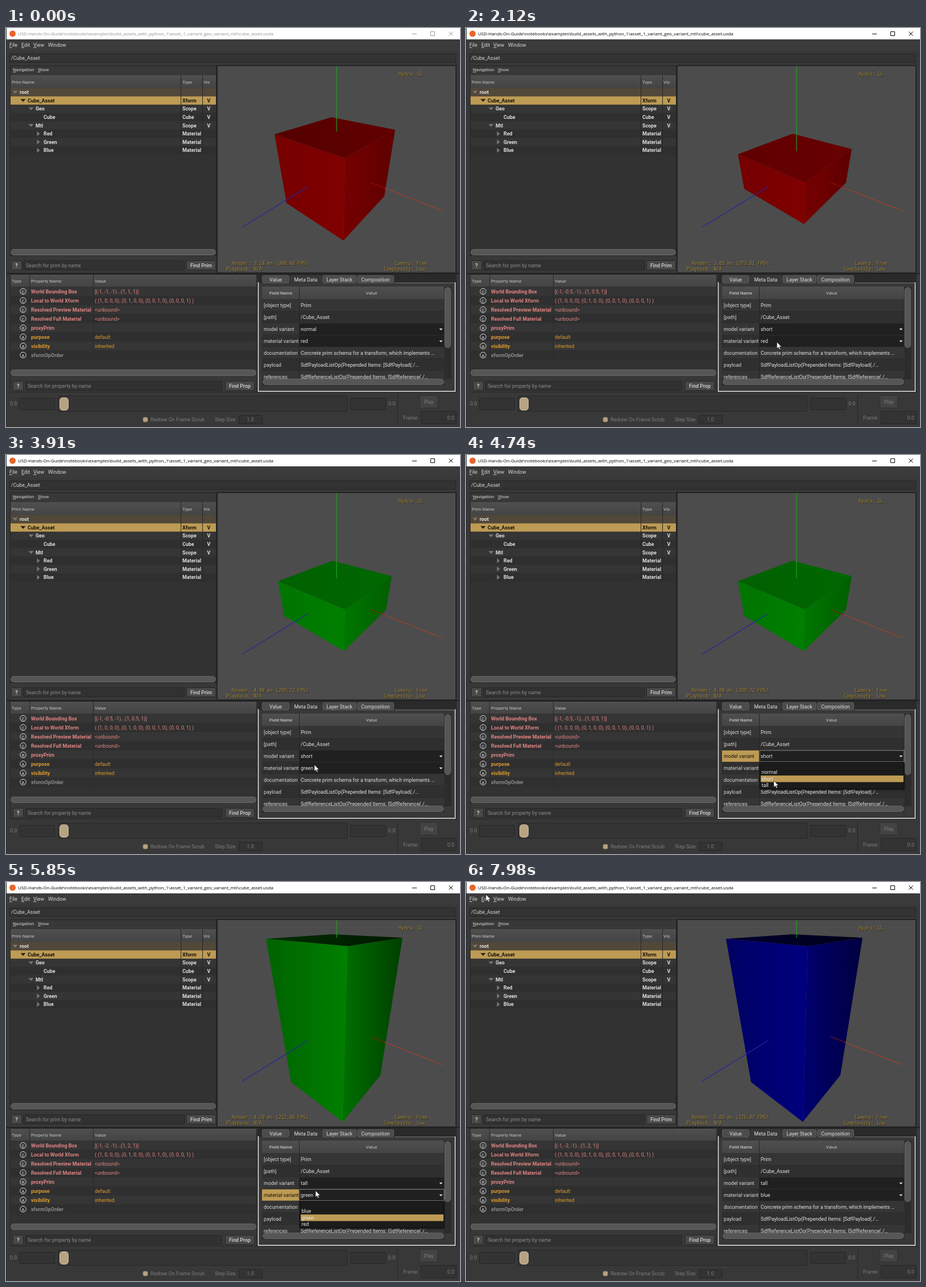
An HTML page that plays this animation: 798 px wide and 702 px high, repeating every 8 s.

```html
<!DOCTYPE html>
<html lang="en">
<head>
<meta charset="utf-8">
<title>Variant switching</title>
<style>
html, body { margin: 0; width: 100%; height: 100%; overflow: hidden; background: #383838; }
svg { display: block; width: 798px; height: 702px; font: 8.9px Roboto, sans-serif; }
.b { font-weight: 700; }
.m { font-weight: 500; }
.s { font-size: 8px; }
.title { font: 7.9px "Open Sans", sans-serif; }
.hud { font: 8px "DejaVu Sans Mono", monospace; }
</style>
</head>
<body>
<svg id="stage" viewBox="0 0 798 702"></svg>
<script>
const LIGHT = '#d6d6d6', GOLD = '#bd9b54', PINK = '#e08482', AMBER = '#dc9a2c', DIM = '#7d7d7d';

const rect = (x, y, w, h, fill, extra = '') =>
  `<rect x="${x}" y="${y}" width="${w}" height="${h}" fill="${fill}" ${extra}/>`;
const box = (x, y, w, h, fill, line = '#262626', r = 1) =>
  rect(x + .5, y + .5, w - 1, h - 1, fill, `stroke="${line}" rx="${r}"`);
// y is the vertical middle of the text line
const text = (x, y, s, fill = LIGHT, cls = '', extra = '') =>
  `<text x="${x}" y="${y + 3.2}" fill="${fill}" class="${cls}" ${extra}>${s}</text>`;
const mid = 'text-anchor="middle"';
const path = (d, fill, extra = '') => `<path d="${d}" fill="${fill}" ${extra}/>`;
const line = (d, color, w = 1) => path(d, 'none', `stroke="${color}" stroke-width="${w}"`);
const down = (x, y, c) => path(`M${x - 4.5} ${y - 2.5}h9l-4.5 5z`, c);
const right = (x, y, c) => path(`M${x - 2.5} ${y - 4.5}v9l5-4.5z`, c);
const mnemonic = s => `<tspan text-decoration="underline">${s[0]}</tspan>${s.slice(1)}`;
const hud = (x, y, s, id = '') =>
  `<text class="hud" x="${x + .7}" y="${y + 3.7}" fill="#1c1a14" data-hud="${id}">${s}</text>` +
  `<text class="hud" x="${x}" y="${y + 3}" fill="#a98a3a" data-hud="${id}">${s}</text>`;

function titleBar() {
  return rect(0, 0, 798, 20, '#fff') + '<circle cx="11.5" cy="10" r="5.5" fill="#e8662a"/>' +
    text(21, 10, 'USD-Hands-On-Guide\\notebooks\\examples\\build_assets_with_python_1' +
      '\\asset_1_variant_geo_variant_mtl\\cube_asset.usda', '#000', 'title', 'id="title"') +
    '<g id="buttons" fill="none" stroke="#000">' +
    '<path d="M714 10.5h8M746.5 6.5h7v7h-7zM778.500 6.500l7 7M785.500 6.500l-7 7"/></g>';
}

function menu() {
  return rect(0, 20, 798, 20, '#3b3b3b') +
    text(6, 30, mnemonic('File')) + text(27, 30, mnemonic('Edit')) +
    text(48, 30, mnemonic('View')) + text(74, 30, 'Window') +
    box(6, 45, 785, 16, '#333') + text(9, 53, '/Cube_Asset');
}

function tree() {
  const rows = [
    ['root', 24, '', ''], ['Cube_Asset', 38, 'Xform', 'V'], ['Geo', 52, 'Scope', 'V'],
    ['Cube', 66, 'Cube', 'V'], ['Mtl', 52, 'Scope', 'V'], ['Red', 66, 'Material', ''],
    ['Green', 66, 'Material', ''], ['Blue', 66, 'Material', '']
  ];
  let out = rect(7, 66, 363, 335, '#242424') + rect(8, 67, 361, 16, '#383838') +
    text(12, 73, mnemonic('Navigation'), LIGHT, '', 'style="font-size:7.8px"') +
    text(56, 73, mnemonic('Show'), LIGHT, '', 'style="font-size:7.8px"') +
    rect(8, 83, 361, 23, 'url(#head)') +
    text(10, 95, 'Prim Name', '#c4c4c4', 's') + text(310, 95, 'Type', '#c4c4c4', 's') +
    text(347, 95, 'Vis', '#c4c4c4', 's') + rect(8, 106, 361, 283, '#323232');
  rows.forEach(([name, x, type, vis], i) => {
    const y = 113 + i * 14.6, sel = i === 1, c = sel ? '#17130a' : '#dedede';
    const fill = i === 0 ? '#52483a' : sel ? GOLD : i % 2 ? '#2f2f2f' : '#353535';
    out += rect(8, y - 7.3, 361, 14.6, fill);
    if (i === 4) out += rect(36, y - 7.3, 333, 14.6, '#52483a', 'id="hover"');
    if (i > 4) out += right(57, y, '#777');
    else if (i !== 3) out += down(x - 8, y, sel ? '#2a2110' : '#777');
    out += text(x, y, name, c, 'b') + text(310, y, type, c, 'b') + text(356.5, y, vis, c, 'b', mid);
  });
  return out + rect(307, 83, 1, 140, '#262626') + rect(345, 83, 1, 140, '#262626') +
    rect(8, 389, 361, 11.5, '#2c2c2c') + box(8, 389, 361, 11, '#565656', '#686868', 5) +
    box(9, 409, 19, 17, '#494949') + text(18.5, 417.5, '?', LIGHT, 'b', mid) +
    box(30, 409, 284, 17, '#313131') + text(35, 417.5, 'Search for prim by name', '#8c8c8c') +
    box(317, 409, 52, 17, '#494949') + text(343, 417.5, 'Find Prim', LIGHT, 'm', mid);
}

function viewport() {
  return rect(370, 65, 422, 367, '#242424') + rect(372, 67, 418, 363, '#4c4c4c') +
    '<path id="faceTop" fill="url(#gTop)"/><path id="faceLeft" fill="url(#gLeft)"/>' +
    '<path id="faceRight" fill="url(#gRight)"/>' +
    '<path id="axisY" stroke="#1fa01f" stroke-width="1.2"/>' +
    line('M531 279L415 350.500', '#25259a', 1.2) +
    line('M641 272L665 281.500', '#a01408') +
    path('M665 281.500L768 322', 'none', 'stroke="#c23a22" stroke-width="1.2" stroke-dasharray="2 .7"') +
    hud(690, 81, 'Hydra: GL') + hud(397, 414, '', 'render') + hud(387, 424, 'Playback: N/A') +
    hud(683, 414, 'Camera: Free') + hud(664, 424, 'Complexity: Low');
}

function properties() {
  const rows = [
    ['C', 'World Bounding Box', ' ', PINK],
    ['C', 'Local to World Xform', '( (1, 0, 0, 0), (0, 1, 0, 0), (0, 0, 1, 0), (0, 0, 0, 1) )', PINK],
    ['C', 'Resolved Preview Material', '&lt;unbound&gt;', PINK],
    ['C', 'Resolved Full Material', '&lt;unbound&gt;', PINK],
    ['R', 'proxyPrim', '', PINK], ['A', 'purpose', 'default', AMBER],
    ['A', 'visibility', 'inherited', AMBER], ['A', 'xformOpOrder', '', '#8c8c8c']
  ];
  let out = rect(0, 431, 798, 2, '#222') + rect(7, 433, 434, 208, '#262626') +
    rect(8, 434, 432, 206, '#383838') + rect(8, 434, 432, 21, 'url(#head)') +
    text(10, 444.5, 'Type', '#c4c4c4', 's') + text(44, 444.5, 'Property Name', '#c4c4c4', 's') +
    text(156, 444.5, 'Value', '#c4c4c4', 's') + rect(8, 455, 432, 146, '#323232');
  rows.forEach(([kind, name, value, c], i) => {
    const y = 463.5 + i * 16;
    out += rect(8, y - 8, 432, 16, i % 2 ? '#2f2f2f' : '#353535') +
      `<circle cx="30" cy="${y}" r="5.2" fill="none" stroke="#dcdcdc"/>` +
      text(30, y - .2, kind, '#e8e8e8', '', `${mid} style="font-size:7.5px"`) +
      text(44, y, name, c, 'b') + text(156, y, value, c, '', i ? '' : 'id="bounds"');
  });
  return out + rect(41, 434, 1, 150, '#2a2a2a') + rect(153, 434, 1, 150, '#2a2a2a') +
    box(8, 601, 432, 11, '#565656', '#686868', 5) +
    box(12, 621, 19, 17, '#494949') + text(21.5, 629.5, '?', LIGHT, 'b', mid) +
    box(34, 621, 346, 17, '#313131') + text(38, 629.5, 'Search for property by name', '#8c8c8c') +
    box(385, 621, 52, 17, '#494949') + text(411, 629.5, 'Find Prop', LIGHT, 'm', mid);
}

function metadata() {
  const rows = [
    ['[object type]', 'Prim'], ['[path]', '/Cube_Asset'], ['model variant', ''],
    ['material variant', ''], ['documentation', 'Concrete prim schema for a transform, which implements …'],
    ['payload', 'SdfPayloadListOp(Prepended Items: [SdfPayload(./…'],
    ['references', 'SdfReferenceListOp(Prepended Items: [SdfReference(./…']
  ];
  const tabs = [['Value', 450, 48], ['Meta Data', 499, 56], ['Layer Stack', 556, 60], ['Composition', 617, 65]];
  let out = rect(442, 433, 350, 208, '#2a2a2a') + rect(444, 449, 345, 189, '#383838') +
    line('M683 448.500H790', '#777') + line('M443.500 447V639.300H789.500V447.500', '#ececec', 1.4);
  tabs.forEach(([s, x, w], i) => {
    out += box(x, 435, w, 14, i === 1 ? '#383838' : '#4c4c4c', i === 1 ? '#383838' : '#5c5c5c', 2) +
      text(x + w / 2, 442.5, s, '#e2e2e2', '', mid);
  });
  out += rect(450, 455, 321, 162, '#303030') + rect(450, 455, 320, 22, 'url(#head)') +
    text(483, 466, 'Field Name', '#c4c4c4', 's m', mid) + text(642.5, 466, 'Value', '#c4c4c4', 's', mid) +
    '<svg x="450" y="477" width="321" height="140" viewBox="450 477 321 140">';
  rows.forEach(([name, value], i) => {
    const y = 488 + i * 20.9, combo = i === 2 || i === 3;
    out += rect(450, y - 10.4, 320, 20.9, i % 2 ? '#2f2f2f' : '#353535') +
      rect(450, y + 10, 320, .7, '#262626');
    if (combo) out += rect(516, y - 10, 254, 20, '#202020', `id="combo${i - 2}"`) +
      rect(450, y - 10, 65, 20, GOLD, `id="cell${i - 2}"`) +
      path(`M761.500 ${y - 1}h6l-3 3z`, '#eee');
    out += text(453, y, name, LIGHT, '', combo ? `id="name${i - 2}"` : '') +
      text(518, y, value, '#e2e2e2', '', combo ? `id="value${i - 2}"` : '');
  });
  return out + '</svg>' + rect(515, 455, 1, 162, '#262626') +
    rect(771, 455, 12, 163, '#2c2c2c') + box(771, 456, 11, 107, '#565656', '#686868', 5) +
    rect(450, 617, 321, 12, '#2c2c2c') + box(451, 617, 319, 11, '#565656', '#686868', 5);
}

function timeline() {
  return text(7, 661, '0.0', DIM) + box(23, 651, 63, 21, '#333') +
    box(91, 647, 509, 28, '#343434') + box(94, 650, 16, 23, '#b7a282', '#d2c3aa', 5) +
    box(605, 651, 63, 21, '#333') + text(672, 661, '0.0', DIM) +
    rect(688, 645, 1, 53, '#272727') + box(727, 646, 32, 23, '#434343', '#303030', 2) +
    text(743, 658, 'Play', DIM, '', mid) + text(698, 686, 'Frame:', DIM) +
    box(729, 674, 63, 23, '#333') + text(788, 686, '0.0', DIM, '', 'text-anchor="end"') +
    box(240.500, 684.500, 9, 9, '#b7a282', '#8c7c64', 2) + text(254, 689, 'Redraw On Frame Scrub', DIM) +
    text(367, 689, 'Step Size', DIM) + box(409, 681, 42, 16, '#333') + text(429.5, 689, '1.0', DIM, '', mid);
}

const gradient = id => `<linearGradient id="${id}"><stop/><stop offset="1"/></linearGradient>`;
const stage = document.getElementById('stage');
stage.innerHTML =
  '<defs><linearGradient id="head" x2="0" y2="1"><stop stop-color="#4f4f4f"/>' +
  '<stop offset="1" stop-color="#444"/></linearGradient>' +
  ['gTop', 'gLeft', 'gRight'].map(gradient).join('') + '</defs>' +
  rect(0, 0, 798, 702, '#383838') + titleBar() + menu() + tree() + viewport() +
  properties() + metadata() + timeline() + rect(0, 0, 1, 702, '#2a2a2a') +
  '<g id="popup"></g><circle id="click" r="8" fill="#f2dc10" fill-opacity=".72"/>' +
  '<path id="cursor" d="M0 0V11.500L2.700 9.100L4.600 13.300L6.400 12.500L4.500 8.400H8.200Z" ' +
  'fill="#fff" stroke="#111" stroke-width=".6"/>';

const $ = id => document.getElementById(id);
const set = (id, name, value) => $(id).setAttribute(name, value);
const show = (id, on) => set(id, 'visibility', on ? 'visible' : 'hidden');

// Corners: back, left, front and right of the top, then left, front and right of the base.
const shapes = {
  normal: { pts: ['572 157', '472 187', '596 229', '684 179', '493 308', '593 374', '665 296'],
    axis: 182, top: [84, 98], left: [118, 128], right: [118, 94], bounds: '[(-1, -1, -1)...(1, 1, 1)]' },
  short: { pts: ['574 186', '478 222', '596 272', '678 213', '489 283', '594 345', '668 272'],
    axis: 217, top: [96, 104], left: [116, 128], right: [118, 94], bounds: '[(-1, -0.5, -1)...(1, 0.5, 1)]' },
  tall: { pts: ['573 92', '457 100', '601 113', '697 98', '501 352', '592 422', '658 340'],
    axis: 98, top: [46, 24], left: [98, 128], right: [112, 62], bounds: '[(-1, -2, -1)...(1, 2, 1)]' }
};
const options = [['', 'normal', 'short', 'tall'], ['', 'blue', 'green', 'red']];
const models = [[0, 'normal'], [1840, 'short'], [5220, 'tall']];
const materials = [[0, 'red'], [3630, 'green'], [6950, 'blue']];
const stats = [[0, '3.24 ms (308.68'], [820, '3.31 ms (301.74'], [1840, '3.65 ms (273.81'],
  [3630, '4.98 ms (200.72'], [5220, '4.70 ms (212.86'], [6950, '5.65 ms (176.87']];
// field, selected from, list opens, list closes
const picks = [[0, 820, 890, 1770], [1, 2590, 2660, 3560], [0, 4320, 4390, 5080], [1, 5780, 5850, 6870]];
const clicks = [[750, 890], [1630, 1770], [2520, 2660], [3490, 3630], [4250, 4390],
  [5010, 5150], [5710, 5850], [6740, 6870]];
const bursts = [[70, 820], [890, 1370], [1630, 2260], [2520, 3290], [3490, 3910],
  [4110, 4880], [5010, 5780], [5850, 6610], [6740, 7490], [7560, 7980]];
const track = [[0, 590, 712], [70, 590, 704], [680, 549, 528], [890, 549, 529], [1090, 550, 554],
  [1370, 548, 567], [1770, 548, 567], [2260, 546, 549], [2660, 546, 549], [3010, 546, 568],
  [3290, 544, 588], [3630, 544, 588], [3910, 542, 545], [4180, 541, 529], [4390, 541, 529],
  [4740, 541, 573], [4880, 541, 578], [5150, 541, 579], [5640, 544, 543], [5980, 544, 543],
  [6540, 537, 580], [6900, 537, 580], [7490, 105, 165], [7560, 96, 150], [7910, 36, 24], [7980, 35, 22]];

const latest = (list, t) => list.filter(e => e[0] <= t).pop()[1];

function sample(t) {
  const burst = bursts.filter(b => b[0] <= t).pop();
  if (!burst) return 0;
  return Math.min(burst[1], burst[0] + Math.floor((t - burst[0]) / 70) * 70);
}

function pointer(t) {
  const i = track.findIndex(k => k[0] > t);
  if (i < 0) return track[track.length - 1].slice(1);
  const [t0, x0, y0] = track[i - 1], [t1, x1, y1] = track[i];
  const u = (t - t0) / (t1 - t0), e = u * u * (3 - 2 * u);
  return [x0 + (x1 - x0) * e, y0 + (y1 - y0) * e];
}

function drawCube(model, material) {
  const s = shapes[model], p = s.pts;
  const face = (id, list) => set(id, 'd', 'M' + list.map(i => p[i]).join('L') + 'Z');
  face('faceTop', [0, 1, 2, 3]);
  face('faceLeft', [1, 2, 5, 4]);
  face('faceRight', [2, 3, 6, 5]);
  const tint = v => `rgb(${['red', 'green', 'blue'].map(c => c === material ? v : 0)})`;
  [['gTop', s.top], ['gLeft', s.left], ['gRight', s.right]].forEach(([id, shade]) =>
    shade.forEach((v, i) => $(id).children[i].setAttribute('stop-color', tint(v))));
  set('axisY', 'd', `M581 67V${s.axis}`);
  $('bounds').textContent = s.bounds;
}

function drawPopup(field, value, y) {
  const top = field ? 561 : 540, list = options[field];
  const row = y < top ? list.indexOf(value) : Math.min(3, Math.floor((y - top) / 11.8));
  return rect(518, top + 2, 254, 48.5, '#000', 'opacity=".3"') +
    box(516, top, 254, 48, '#1b1b1b', '#0c0c0c', 0) +
    rect(518, top + .5 + row * 11.7, 251, 11.6, GOLD) +
    list.map((s, i) => text(519.5, top + 6 + i * 11.7, s, '#e6e6e6')).join('');
}

let last = -1;
function draw(now) {
  const t = now % 8000, q = sample(t);
  if (q !== last) {
    last = q;
    const model = latest(models, q), material = latest(materials, q), values = [model, material];
    const [x, y] = pointer(q), active = q >= 750;
    set('title', 'fill', active ? '#000' : '#8f8f8f');
    set('buttons', 'stroke', active ? '#000' : '#999');
    drawCube(model, material);
    document.querySelectorAll('[data-hud=render]').forEach(e =>
      e.textContent = `Render: ${latest(stats, q)} FPS)`);
    const pick = picks.find(p => q >= p[1] && q < p[3]);
    values.forEach((v, i) => {
      const on = !!pick && pick[0] === i;
      show('cell' + i, on);
      set('name' + i, 'fill', on ? '#17130a' : LIGHT);
      set('combo' + i, 'stroke', on ? '#8a8a8a' : 'none');
      $('value' + i).textContent = v;
    });
    $('popup').innerHTML = pick && q >= pick[2] ? drawPopup(pick[0], values[pick[0]], y) : '';
    show('click', clicks.some(c => q >= c[0] && q < c[1]));
    set('click', 'cx', x);
    set('click', 'cy', y);
    set('cursor', 'transform', `translate(${x} ${y})`);
    show('hover', x < 369 && y > 164 && y < 179);
  }
  requestAnimationFrame(draw);
}
requestAnimationFrame(draw);
</script>
</body>
</html>
```
